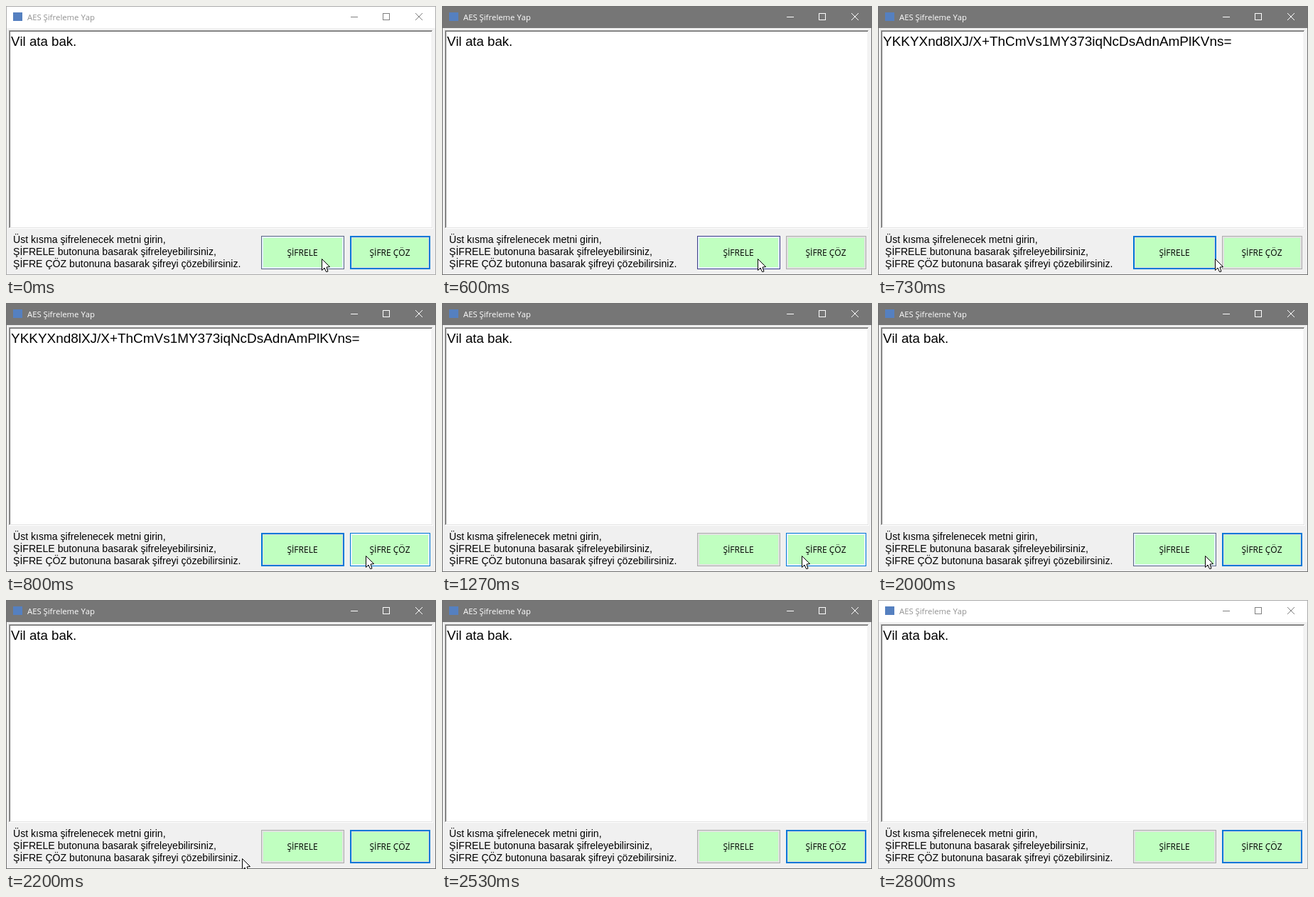
An HTML page with a canvas that plays this animation: 605x378 px, repeating every 2.94 s.

```html
<!DOCTYPE html>
<html lang="tr">
<head>
<meta charset="utf-8">
<title>AES Şifreleme Yap</title>
<style>
html, body { margin: 0; width: 100%; height: 100%; overflow: hidden; background: #f0f0f0; }
canvas { display: block; width: 605px; height: 378px; }
</style>
</head>
<body>
<canvas id="stage" width="605" height="378"></canvas>
<script>
const ctx = document.getElementById('stage').getContext('2d');
const LOOP = 2940;
const ARIAL = '"Liberation Sans", Arial, sans-serif';
const UI = '"Open Sans", "Noto Sans", sans-serif';
const BLUE = '#0078d7', IDLE = '#adadad', HOVER = '#5c6684', PRESSED = '#3c3c88';
const PLAIN = 'Vil ata bak.';
const CIPHER = 'YKKYXnd8lXJ/X+ThCmVs1MY373iqNcDsAdnAmPlKVns=';
const HELP = [
  'Üst kısma şifrelenecek metni girin,',
  'ŞİFRELE butonuna basarak şifreleyebilirsiniz,',
  'ŞİFRE ÇÖZ butonuna basarak şifreyi çözebilirsiniz.'
];

// Pointer tip: [start time, x, y]
const POINTER = [
  [0, 444, 355], [730, 474, 355], [800, 506, 355], [1730, 484, 355],
  [1870, 478, 355], [2000, 460, 355], [2070, 430, 357], [2130, 385, 360],
  [2200, 332, 363], [2270, 274, 366], [2330, 220, 368], [2400, 191, 371],
  [2470, 163, 374], [2530, 0, 400]
];
// Button borders: [start time, colour, width]
const ENCRYPT = [
  [0, HOVER, 1], [600, PRESSED, 1], [730, BLUE, 2], [1270, IDLE, 1],
  [2000, HOVER, 1], [2200, IDLE, 1]
];
const DECRYPT = [[0, BLUE, 2], [600, IDLE, 1], [800, BLUE, 1], [1870, BLUE, 2]];

const at = (track, t) => track.filter(k => k[0] <= t).pop();

function box(x, y, w, h, color) {
  ctx.fillStyle = color;
  ctx.fillRect(x, y, w, h);
}

function frame(x, y, w, h, color, size = 1) {
  ctx.strokeStyle = color;
  ctx.lineWidth = size;
  ctx.strokeRect(x + size / 2, y + size / 2, w - size, h - size);
}

function text(str, x, y, size, family, color = '#000', align = 'left') {
  ctx.font = `${size}px ${family}`;
  ctx.fillStyle = color;
  ctx.textAlign = align;
  ctx.fillText(str, x, y);
}

function titleBar(active) {
  const ink = active ? '#fff' : '#808080';
  box(0, 0, 605, 31, active ? '#767676' : '#fff');
  box(10, 9, 13, 12, '#5580c0');
  text('AES Şifreleme Yap', 30, 20, 11.3, UI, active ? '#fff' : '#929292');
  box(485, 15, 10, 1, ink);
  frame(530, 10, 10, 10, ink);
  ctx.strokeStyle = ink;
  ctx.lineWidth = 1;
  ctx.beginPath();
  ctx.moveTo(576, 10);
  ctx.lineTo(586, 20);
  ctx.moveTo(586, 10);
  ctx.lineTo(576, 20);
  ctx.stroke();
}

function textBox(t) {
  box(4, 34, 597, 279, '#fff');
  box(4, 34, 596, 1, '#a0a0a0');
  box(4, 34, 1, 278, '#a0a0a0');
  box(5, 35, 594, 1, '#696969');
  box(5, 35, 1, 276, '#696969');
  box(5, 311, 595, 1, '#e3e3e3');
  box(599, 35, 1, 277, '#e3e3e3');
  const secret = t >= 730 && t < 1270;
  text(secret ? CIPHER : PLAIN, 7, 56, secret ? 18.95 : 18.67, ARIAL);
}

// The green face sits inside a pale rim, which turns bluish under the pointer.
function button(label, x, w, [, color, size]) {
  const calm = color === IDLE || size === 2;
  box(x, 323, w, 47, calm ? '#e1e1e1' : '#e5f1fb');
  box(x + 3, 326, w - 6, 41, '#c0ffc0');
  frame(x, 323, w, 47, color, size);
  text(label, x + w / 2 - 0.5, 351, 12, UI, '#000', 'center');
}

function pointer([, x, y]) {
  ctx.save();
  ctx.translate(x + 0.5, y + 0.5);
  ctx.beginPath();
  ctx.moveTo(0, 0);
  for (const [px, py] of [[0, 16], [3.5, 12.5], [6, 18], [8.5, 17.5], [6.5, 11.5], [11, 11]]) ctx.lineTo(px, py);
  ctx.closePath();
  ctx.fillStyle = '#fff';
  ctx.fill();
  ctx.strokeStyle = '#000';
  ctx.lineWidth = 1;
  ctx.lineJoin = 'round';
  ctx.stroke();
  ctx.restore();
}

function draw(t) {
  const active = t >= 600 && t < 2800;
  box(0, 0, 605, 378, '#f0f0f0');
  titleBar(active);
  frame(0, 0, 605, 378, active ? '#707070' : '#aaa');
  textBox(t);
  HELP.forEach((line, i) => text(line, 10, 333 + i * 17, 14.1, ARIAL));
  button('ŞİFRELE', 359, 117, at(ENCRYPT, t));
  button('ŞİFRE ÇÖZ', 484, 113, at(DECRYPT, t));
  pointer(at(POINTER, t));
}

ctx.fontKerning = 'none';
const start = performance.now();
function tick() {
  draw((performance.now() - start) % LOOP);
  requestAnimationFrame(tick);
}
tick();
</script>
</body>
</html>
```
